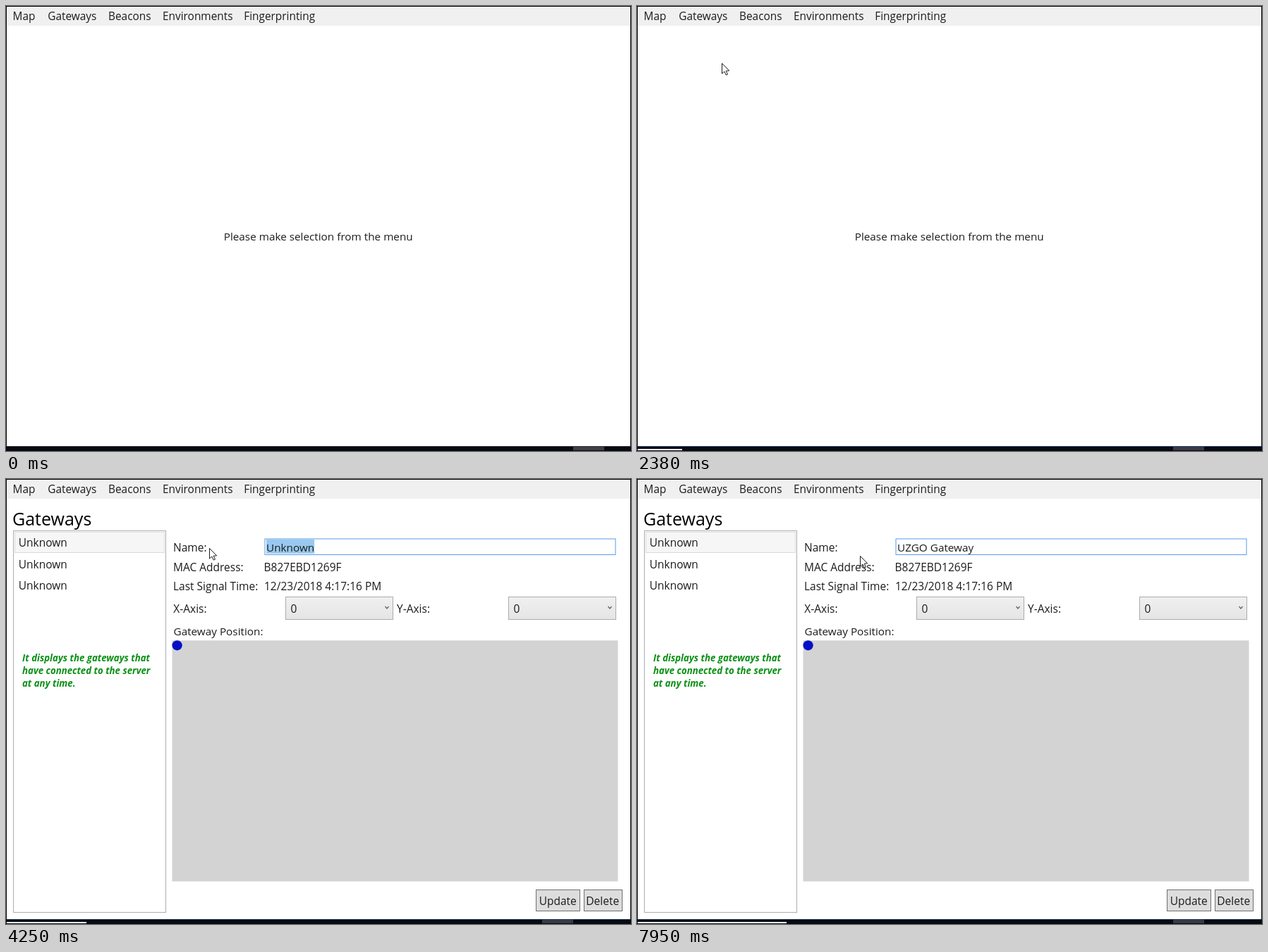
Animation of 886x632 px, one loop 8000 ms. Source, as an HTML page with a canvas:

```html
<!DOCTYPE html>
<html lang="en">
<head>
<meta charset="utf-8">
<title>Gateways</title>
<style>
html, body { margin: 0; width: 100%; height: 100%; overflow: hidden; background: #fff; }
canvas { display: block; }
</style>
</head>
<body>
<canvas id="stage" width="886" height="632"></canvas>
<script>
const ctx = document.getElementById('stage').getContext('2d');
const LOOP = 8000;
const PAGE_AT = 2460, FOCUS_AT = 3460, TASKBAR_AT = 1400;
const DRAG = [3500, 4240];
const BLINK = 530;
const FONT = '"Open Sans", "Noto Sans", sans-serif';

const OLD_NAME = 'Unknown';
const NEW_NAME = 'UZGO Gateway';
const KEYS = [4420, 4620, 4830, 5030, 5230, 5480, 5780, 6060, 6320, 6600, 6900, 7180];

// Pointer stops: time, x, y
const PATH = [
  [70, 747, 560], [420, 420, 270], [830, 121, 75], [1060, 120, 39],
  [1300, 104, 14], [1760, 104, 14], [2300, 120, 81], [2459, 120, 81],
  [2460, 102, 82], [2620, 102, 82], [2860, 200, 70], [3380, 458, 99],
  [3580, 458, 99], [4200, 288, 98], [5120, 288, 98], [6000, 316, 109]
];

function rect(x, y, w, h, fill, stroke) {
  ctx.fillStyle = fill;
  ctx.fillRect(x, y, w, h);
  if (!stroke) return;
  ctx.strokeStyle = stroke;
  ctx.lineWidth = 1;
  ctx.strokeRect(x + 0.5, y + 0.5, w - 1, h - 1);
}

function text(s, x, y, size = 15.5, color = '#1c1c1c', style = '') {
  ctx.font = `${style} ${size}px ${FONT}`;
  ctx.fillStyle = color;
  ctx.fillText(s, x, y);
}

function disc(x, y, r, fill) {
  ctx.fillStyle = fill;
  ctx.beginPath();
  ctx.arc(x, y, r, 0, Math.PI * 2);
  ctx.fill();
}

function pointerAt(t) {
  let i = 0;
  while (i < PATH.length - 1 && t >= PATH[i + 1][0]) i++;
  const a = PATH[i], b = PATH[i + 1];
  if (!b) return [a[1], a[2]];
  const u = (t - a[0]) / (b[0] - a[0]);
  const e = u * u * (3 - 2 * u);
  return [a[1] + (b[1] - a[1]) * e, a[2] + (b[2] - a[2]) * e].map(Math.round);
}

function drawPointer(t) {
  if (t < 70) return;
  const [x, y] = pointerAt(t);
  if (t >= DRAG[0] && t < DRAG[1]) disc(x, y, 11, 'rgba(255, 246, 40, 0.62)');
  ctx.save();
  ctx.translate(x + 0.5, y + 0.5);
  ctx.beginPath();
  ctx.moveTo(0, 0);
  for (const [px, py] of [[0, 14.5], [3.4, 11.5], [5.8, 16.6], [8, 15.6], [5.7, 10.7], [10.2, 10.4]]) {
    ctx.lineTo(px, py);
  }
  ctx.closePath();
  ctx.fillStyle = '#fff';
  ctx.fill();
  ctx.strokeStyle = '#1a1a1f';
  ctx.lineWidth = 1;
  ctx.stroke();
  ctx.restore();
}

function drawMenu() {
  rect(1, 1, 884, 27, '#f0f0f0');
  const items = { Map: 9.5, Gateways: 59.3, Beacons: 145, Environments: 222, Fingerprinting: 337.2 };
  for (const name in items) text(name, items[name], 20, 15.4);
}

function drawCombo(x) {
  const g = ctx.createLinearGradient(0, 167, 0, 199);
  g.addColorStop(0, '#f0f0f0');
  g.addColorStop(1, '#e5e5e5');
  rect(x, 167, 153, 33, g, '#acacac');
  text('0', x + 7.5, 190);
  ctx.strokeStyle = '#606060';
  ctx.lineWidth = 1.2;
  ctx.beginPath();
  ctx.moveTo(x + 141.5, 181);
  ctx.lineTo(x + 144, 184);
  ctx.lineTo(x + 146.5, 181);
  ctx.stroke();
}

function drawField(t) {
  const focused = t >= FOCUS_AT;
  rect(366.5, 84.5, 498, 23.5, '#fff', focused ? '#569de5' : '#abadb3');
  const typed = KEYS.filter(k => t >= k).length;
  const value = typed ? NEW_NAME.slice(0, typed) : OLD_NAME;
  const left = 369, size = 15.3;
  ctx.font = `${size}px ${FONT}`;
  const end = left + ctx.measureText(value).width;

  let caret = end, caretFrom = typed ? KEYS[typed - 1] : FOCUS_AT;
  if (!typed && t > DRAG[0]) {
    // Selection follows the pointer, snapped to letter edges
    const px = pointerAt(t)[0];
    for (let n = value.length; n >= 0 && caret > px; n--) {
      caret = left + ctx.measureText(value.slice(0, n)).width;
    }
    if (caret < end) {
      rect(caret, 86, end - caret, 20, '#99c9ef');
      caretFrom = null;
    }
  }
  text(value, left, 102.5, size);
  const lit = caretFrom !== null && Math.floor((t - caretFrom) / BLINK) % 2 === 0;
  if (focused && lit) rect(Math.floor(caret), 86, 1, 20, '#000');
}

function drawPage(t) {
  text('Gateways', 9, 66, 25, '#000');

  rect(10, 73, 217, 543, '#fff', '#abadb3');
  rect(12, 75, 213, 30, '#f6f6f6', '#dadada');
  for (let i = 0; i < 3; i++) text('Unknown', 17.7, 96 + i * 31 - (i >> 1));
  ['It displays the gateways that', 'have connected to the server', 'at any time.']
    .forEach((s, i) => text(s, 23, 259 + i * 18, 13.25, '#0a9014', 'italic bold'));

  text('Name:', 237, 102.5);
  text('MAC Address:', 237, 130.5);
  text('B827EBD1269F', 365.5, 130.5);
  text('Last Signal Time:', 237, 157.5);
  text('12/23/2018 4:17:16 PM', 366, 157.5);
  text('X-Axis:', 237.3, 190);
  text('Y-Axis:', 554, 190);
  text('Gateway Position:', 237.5, 222, 15.3);
  drawField(t);
  drawCombo(396);
  drawCombo(712);

  rect(235.5, 229.3, 632, 342.2, '#d3d3d3');
  disc(242.6, 236.3, 7.1, '#0510c4');

  rect(751, 583, 63, 31, '#dddddd', '#707070');
  rect(819, 583, 55, 31, '#dddddd', '#707070');
  text('Update', 755.7, 604.5);
  text('Delete', 822.3, 604.5);
}

function drawFrame(t) {
  const switched = t >= TASKBAR_AT;
  rect(0, 0, 886, 632, '#fff');
  drawMenu();
  if (t < PAGE_AT) text('Please make selection from the menu', 308.7, 333, 15.3);
  else drawPage(t);

  ctx.fillStyle = '#000';
  ctx.fillRect(0, 0, 886, 1);
  ctx.fillRect(0, 0, 1, 632);
  ctx.fillRect(885, 0, 1, 632);
  rect(0, 625, 886, 7, '#080a12');
  rect(1, 625, 884, 1, switched ? '#1d3f66' : '#30323a');
  rect(switched ? 760 : 804, 626, 44, 5, switched ? '#3a3a46' : '#413e47');
  rect(1, 629, Math.round(t * 0.0265), 2, '#fff');
  drawPointer(t);
}

const start = performance.now();
function tick() {
  drawFrame((performance.now() - start) % LOOP);
  requestAnimationFrame(tick);
}
tick();
</script>
</body>
</html>
```
